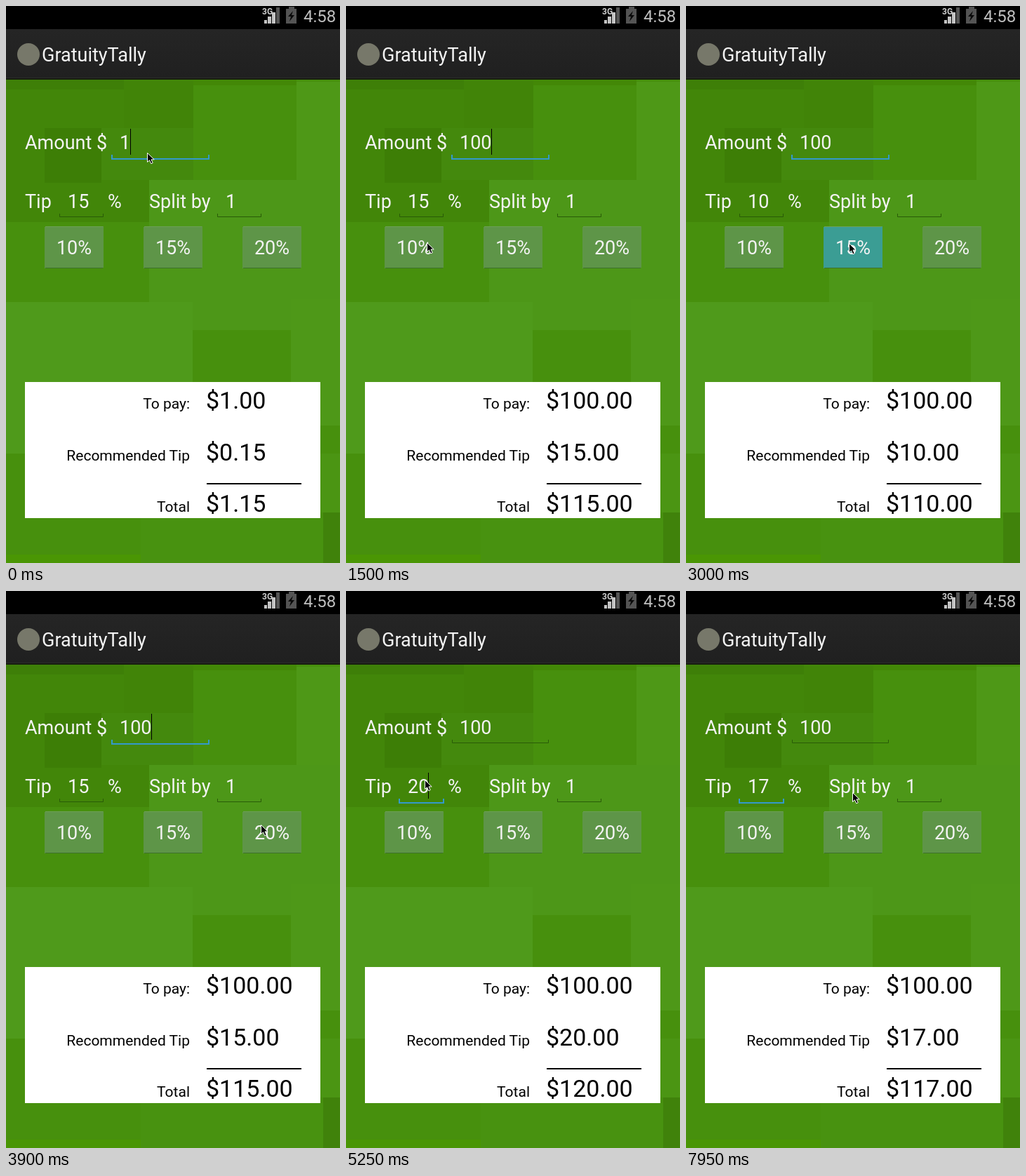
An HTML page for the animation above (8000 ms loop, 476x794 px).

```html
<!DOCTYPE html>
<html>
<head>
<meta charset="utf-8">
<style>
  html, body { margin: 0; width: 100%; height: 100%; overflow: hidden; background: #000; }
  svg { display: block; width: 476px; height: 794px; font: 27px Roboto, sans-serif; fill: #f3f3f3; }
  rect { shape-rendering: crispEdges; }
  #receipt text { fill: #000; font-size: 34px; }
  #receipt .label { font-size: 21px; text-anchor: end; }
  .button text { text-anchor: middle; }
  .field path { fill: none; stroke: #295b08; }
  .field.focus path { stroke: #3399cc; stroke-width: 2; }
</style>
</head>
<body>
<svg viewBox="0 0 476 794">
  <defs>
    <linearGradient id="bar" x2="0" y2="1">
      <stop stop-color="#252525"/><stop offset="1" stop-color="#202020"/>
    </linearGradient>
  </defs>
  <g id="backdrop"></g>

  <rect width="476" height="33" fill="#000"/>
  <rect y="33" width="476" height="70" fill="url(#bar)"/>
  <rect y="102" width="476" height="1" fill="#2b2b2b"/>
  <rect y="103" width="476" height="2" fill="#171c10"/>
  <text x="365" y="12" font-size="12" font-weight="bold" fill="#ccc">3G</text>
  <path d="M368 25v-5h4v5zM373 25v-10h5v10zM379 25v-16h5v16z" fill="#c4c4c4"/>
  <path d="M385 25v-23h5v23z" fill="#555"/>
  <path d="M403 1h8v3h3v21h-15v-21h4z" fill="#545454"/>
  <path d="M409 7l-7 8h4l-2 7 7-9h-4z" fill="#0a0a0a"/>
  <text x="424" y="23" font-size="24" fill="#bebebe">4:58</text>
  <circle cx="32" cy="69" r="16" fill="#77786a"/>
  <text x="51" y="79">GratuityTally</text>

  <text x="27" y="204">Amount $</text>
  <text x="27" y="288">Tip</text>
  <text x="145" y="288">%</text>
  <text x="204" y="288">Split by</text>
  <g class="field" id="amount"><path/><text x="162" y="204"></text></g>
  <g class="field" id="tip"><path/><text x="88" y="288"></text></g>
  <g class="field" id="split"><path/><text x="313" y="288">1</text></g>
  <g id="buttons"></g>

  <g id="receipt">
    <rect x="27" y="536" width="421" height="194" fill="#fff"/>
    <text class="label" x="262" y="574">To pay:</text>
    <text class="label" x="262" y="648">Recommended Tip</text>
    <text class="label" x="262" y="721">Total</text>
    <rect x="286" y="680" width="135" height="2" fill="#000"/>
    <text class="money" x="285" y="574"></text>
    <text class="money" x="285" y="648"></text>
    <text class="money" x="285" y="721"></text>
  </g>

  <rect id="caret" width="1" height="37" fill="#000"/>
  <path id="cursor" d="M.5 .5v13l3-2.7 2.3 5 2.4-1.1-2.2-4.8h4.2z" fill="#000" stroke="#fff"/>
</svg>

<script>
const STEP = 150, LOOP = 8000, DIGIT = 15;
const $ = id => document.getElementById(id);

// Overlapping blocks: x, y, right, bottom, colour
const blocks = [
  [0, 105, 476, 794, '#47900d'],
  [0, 105, 267, 308, '#428609'],
  [0, 105, 168, 119, '#3e7f08'],
  [168, 108, 267, 174, '#418408'],
  [55, 174, 136, 252, '#3d7e06'],
  [136, 174, 267, 248, '#44890d'],
  [267, 105, 414, 113, '#438807'],
  [414, 108, 476, 248, '#4e9817'],
  [204, 248, 476, 462, '#4d9718'],
  [0, 422, 266, 638, '#4f9a1b'],
  [406, 418, 476, 598, '#4e9818'],
  [192, 730, 452, 794, '#489210'],
  [0, 782, 192, 794, '#4a9604'],
  [452, 722, 476, 794, '#40820b'],
  [448, 638, 476, 722, '#4b9513']
];
$('backdrop').innerHTML = blocks.map(([x, y, right, bottom, color]) =>
  `<rect x="${x}" y="${y}" width="${right - x}" height="${bottom - y}" fill="${color}"/>`).join('');

$('buttons').innerHTML = [10, 15, 20].map((percent, i) => {
  const x = 55 + 141 * i;
  return `<g class="button"><rect x="${x}" y="314" width="84" height="60" rx="2"/>
    <rect x="${x + 1}" y="314" width="82" height="1" fill="#6b9f56"/>
    <rect x="${x + 1}" y="373" width="82" height="1" fill="#3e712d"/>
    <text x="${x + 42}" y="354">${percent}%</text></g>`;
}).join('');

const amounts = [[0, '1'], [300, '10'], [450, '100']];
const tips = [[0, '15'], [2100, '10'], [3150, '15'], [4200, '20'],
  [6000, '2'], [6150, ''], [6900, '1'], [7200, '17']];
const presses = [1950, 3000, 4050];
const blinks = [900, 1350, 1950, 2400, 2850, 3450, 4050, 4500, 5400, 5850, 6600, 6900, 7800];
const TIP_FOCUS = 5100;
const track = [[0, 201, 209], [750, 201, 209], [900, 196, 216], [1500, 115, 337],
  [2250, 115, 337], [2850, 232, 338], [3300, 232, 338], [3900, 363, 333], [4050, 364, 343],
  [4350, 364, 343], [4950, 112, 269], [7650, 112, 269], [7950, 237, 287]];

const current = (list, t) => list.filter(([start]) => start <= t).pop()[1];

function cursorAt(t) {
  const next = track.findIndex(([time]) => time > t);
  if (next < 0) return track[track.length - 1].slice(1);
  const [t0, x0, y0] = track[next - 1], [t1, x1, y1] = track[next];
  const k = (t - t0) / (t1 - t0);
  return [Math.round(x0 + (x1 - x0) * k), Math.round(y0 + (y1 - y0) * k)];
}

function drawField(id, left, right, y, focused) {
  const field = $(id), inset = focused ? 0 : .5;
  const bottom = focused ? y + 1 : y - .5;
  field.classList.toggle('focus', focused);
  field.firstChild.setAttribute('d',
    `M${left + inset} ${y - 5}V${bottom}H${right - inset}V${y - 5}`);
}

function render(time) {
  const t = Math.floor(time % LOOP / STEP) * STEP;
  const amount = current(amounts, t), tip = current(tips, t);
  const onTip = t >= TIP_FOCUS;

  $('amount').lastChild.textContent = amount;
  $('tip').lastChild.textContent = tip;
  drawField('amount', 151, 289, 217, !onTip);
  drawField('tip', 76, 139, 301, onTip);
  drawField('split', 301, 364, 301, false);

  // Clearing the field keeps the last valid percentage
  const percent = tip || 2, extra = amount * percent / 100;
  const sums = [+amount, extra, +amount + extra];
  document.querySelectorAll('.money').forEach((el, i) => el.textContent = '$' + sums[i].toFixed(2));

  document.querySelectorAll('.button').forEach((el, i) =>
    el.firstChild.setAttribute('fill', t === presses[i] ? '#3b9d94' : '#5e9548'));

  const caret = $('caret');
  caret.setAttribute('x', onTip ? 88 + DIGIT * tip.length - (tip ? 1 : 0) : 162 + DIGIT * amount.length);
  caret.setAttribute('y', onTip ? 259 : 175);
  caret.style.display = blinks.filter(b => b <= t).length % 2 ? 'none' : '';

  $('cursor').setAttribute('transform', `translate(${cursorAt(t)})`);
}

const start = performance.now();
function tick() {
  render(performance.now() - start);
  requestAnimationFrame(tick);
}
tick();
</script>
</body>
</html>
```
